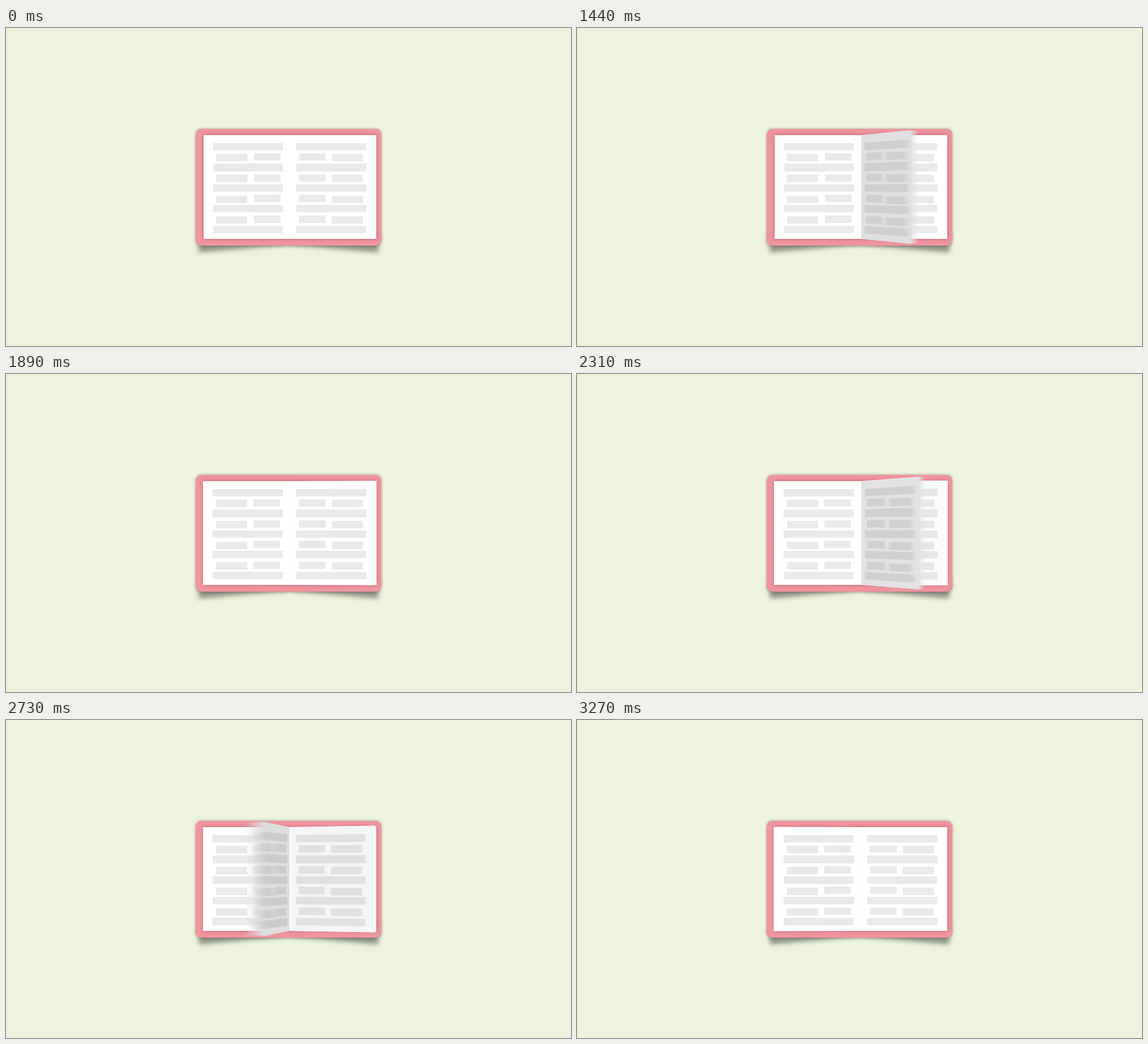
An HTML page without scripts that plays this animation: 998x561 px, repeating every 3330 ms.

```html
<!DOCTYPE html>
<html lang="en">
<head>
<meta charset="utf-8">
<title>Turning pages</title>
<style>
/* --t: progress of a page, 0 = lying right, 1 = lying left */
@property --t { syntax: "<number>"; inherits: true; initial-value: 0; }

html, body { margin: 0; width: 100%; height: 100%; overflow: hidden; background: #eef4db; }
.stage { position: relative; width: 998px; height: 561px; overflow: hidden; }
.stage div, .stage i, i::before, i::after { position: absolute; }

.curl {
  left: 341px; top: 366px; width: 158px; height: 30px;
  background: rgba(0, 0, 0, .4);
  filter: blur(4px);
  transform: rotate(-5deg);
  transform-origin: 0 100%;
}
.curl.flip { left: auto; right: 341px; transform: rotate(5deg); transform-origin: 100% 100%; }
.cover {
  left: 335px; top: 178px; width: 328px; height: 206px;
  border-radius: 10px;
  background: #f0949e;
  box-shadow: 0 0 5px rgba(0, 0, 0, .35);
}
.block {
  left: 349px; top: 189px; width: 304.5px; height: 183px;
  background: #fff;
  box-shadow: 0 0 6px rgba(70, 0, 20, .35);
}

/* one side of a sheet */
i {
  top: 189px; height: 183px;
  background: #fff;
  backface-visibility: hidden;
  opacity: calc(1 / var(--n, 1));
}
i::before {
  content: "";
  top: 14px; width: 123.5px; height: 159.5px;
  --short: transparent 0 19.5px, #eaeaea 0 32.5px, transparent 0 36.5px;
  background:
    repeating-linear-gradient(#eaeaea 0 13px, transparent 0 36.5px),
    repeating-linear-gradient(var(--short)) 5.5px 0 / 55px 100% no-repeat,
    repeating-linear-gradient(transparent 0 18.5px, #eaeaea 0 31.5px, transparent 0 36.5px) 72px 0 / 47px 100% no-repeat;
}
i::after {
  content: "";
  inset: 0;
  background: #000;
  opacity: calc(.58 * var(--t) * (1 - var(--t)));
}
.front i {
  left: 503px; width: 150.5px;
  transform-origin: -1px 50%;
  transform: perspective(1500px) rotateY(calc(var(--t) * -180deg));
  --i: calc(8 - var(--n));
}
.front i::before { left: 10px; transform: scaleX(-1); }
.back i {
  left: 348.3px; width: 152.2px;
  transform-origin: calc(100% + 1.5px) 50%;
  transform: perspective(1500px) rotateY(calc((1 - var(--t)) * 180deg));
  --i: calc(var(--n) - 1);
}
.back i::before { right: 11.5px; }
.back .still { left: 349px; width: 151.5px; --t: 1; }

/* eight layers, slightly apart in time, blend into motion blur */
.sheet i {
  animation: 3330ms cubic-bezier(.89, 0, .54, 1) calc(var(--i) * -2.3ms) infinite;
}
.sheet i:nth-child(1) { --n: 1; }
.sheet i:nth-child(2) { --n: 2; }
.sheet i:nth-child(3) { --n: 3; }
.sheet i:nth-child(4) { --n: 4; }
.sheet i:nth-child(5) { --n: 5; }
.sheet i:nth-child(6) { --n: 6; }
.sheet i:nth-child(7) { --n: 7; }
.sheet i:nth-child(8) { --n: 8; }
.sheet.a i { animation-name: turn-a; }
.sheet.b i { animation-name: turn-b; }
.sheet.c i { animation-name: turn-c; }
.sheet.d i { animation-name: turn-d; }
@keyframes turn-a { 0%, 27.27% { --t: 0; } 55.2%, 100% { --t: 1; } }
@keyframes turn-b { 0%, 53.93% { --t: 0; } 81.86%, 100% { --t: 1; } }
@keyframes turn-c { 0%, 62.76% { --t: 0; } 90.69%, 100% { --t: 1; } }
@keyframes turn-d { 0%, 72.07% { --t: 0; } 100% { --t: 1; } }
</style>
</head>
<body>
<div class="stage">
  <div class="curl"></div>
  <div class="curl flip"></div>
  <div class="cover"></div>
  <div class="block"></div>
  <div class="front">
    <i class="still"></i>
    <div class="sheet d"><i></i><i></i><i></i><i></i><i></i><i></i><i></i><i></i></div>
    <div class="sheet c"><i></i><i></i><i></i><i></i><i></i><i></i><i></i><i></i></div>
    <div class="sheet b"><i></i><i></i><i></i><i></i><i></i><i></i><i></i><i></i></div>
    <div class="sheet a"><i></i><i></i><i></i><i></i><i></i><i></i><i></i><i></i></div>
  </div>
  <div class="back">
    <i class="still"></i>
    <div class="sheet a"><i></i><i></i><i></i><i></i><i></i><i></i><i></i><i></i></div>
    <div class="sheet b"><i></i><i></i><i></i><i></i><i></i><i></i><i></i><i></i></div>
    <div class="sheet c"><i></i><i></i><i></i><i></i><i></i><i></i><i></i><i></i></div>
    <div class="sheet d"><i></i><i></i><i></i><i></i><i></i><i></i><i></i><i></i></div>
  </div>
</div>
</body>
</html>
```
